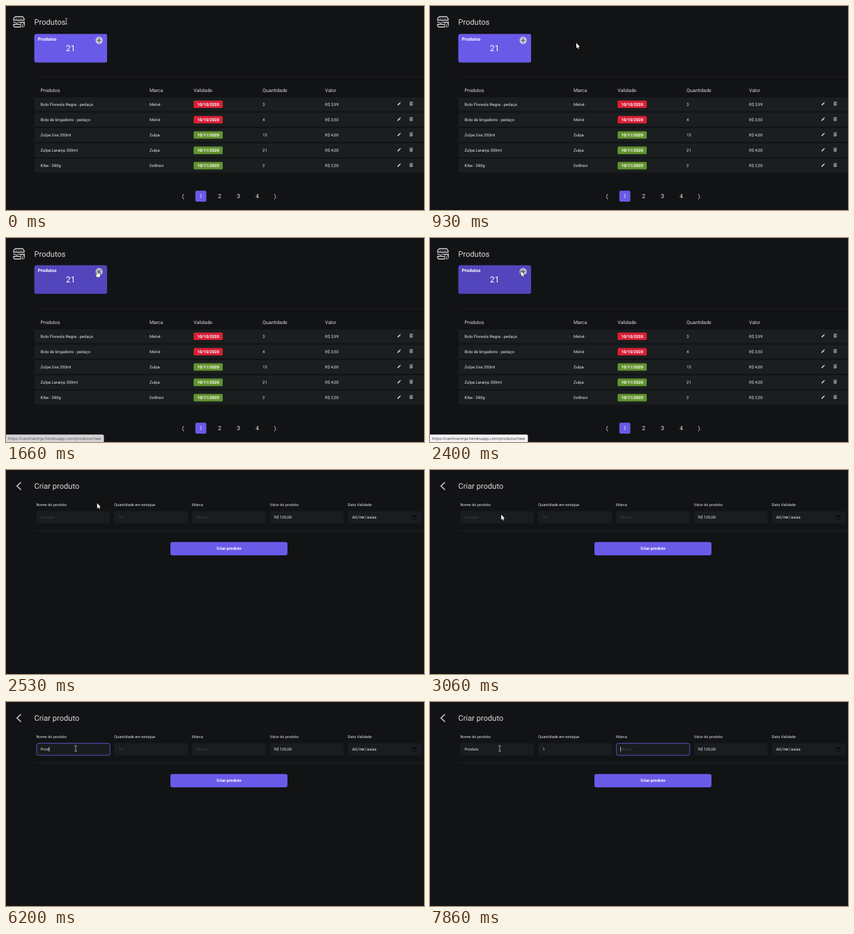
Recreate the animation shown at these times as an HTML page with a canvas. Size 600 by 294 pixels, loop 8000 ms.

```html
<!DOCTYPE html>
<html lang="pt-BR">
<head>
<meta charset="utf-8">
<title>Produtos</title>
<style>
  html, body { margin: 0; width: 100%; height: 100%; overflow: hidden; background: #121315; }
  canvas { display: block; width: 600px; height: 294px; }
</style>
</head>
<body>
<canvas id="stage"></canvas>
<script>
const W = 600, H = 294, LOOP = 8000;
const BG = '#121315', ROW = '#1a1e1f', PURPLE = '#6a5ae8';
const canvas = document.getElementById('stage');
const ctx = canvas.getContext('2d');
const ratio = window.devicePixelRatio || 1;
canvas.width = W * ratio;
canvas.height = H * ratio;

const clamp = v => Math.max(0, Math.min(1, v));
const ease = v => v * v * (3 - 2 * v);
const span = (t, a, b) => ease(clamp((t - a) / (b - a)));
const mix = (a, b, k) => a + (b - a) * k;
const mixRgb = (a, b, k) => `rgb(${a.map((v, i) => Math.round(mix(v, b[i], k)))})`;

function text(str, x, y, size, color = '#e2e2e4', weight = 400, align = 'left', family = 'Roboto') {
  ctx.font = `${weight} ${size}px "${family}", sans-serif`;
  ctx.textAlign = align;
  ctx.fillStyle = color;
  ctx.fillText(str, x, y);
}

function box(x, y, w, h, r, fill, stroke) {
  ctx.beginPath();
  ctx.roundRect(x, y, w, h, r);
  if (fill) { ctx.fillStyle = fill; ctx.fill(); }
  if (stroke) { ctx.strokeStyle = stroke; ctx.lineWidth = 0.9; ctx.stroke(); }
}

function path(d, x, y, fill, stroke, width = 1) {
  const p = new Path2D(d);
  ctx.save();
  ctx.translate(x, y);
  ctx.lineJoin = ctx.lineCap = 'round';
  if (stroke) { ctx.strokeStyle = stroke; ctx.lineWidth = width; ctx.stroke(p); }
  if (fill) { ctx.fillStyle = fill; ctx.fill(p); }
  ctx.restore();
}

// ---- product list ----

const PAGE_SWITCH = 2500;
const rows = [
  ['Bolo Floresta Negra - pedaço', 'Melvê', '10/10/2020', '3', 'R$ 3,99'],
  ['Bolo de brigadeiro - pedaço', 'Melvê', '10/10/2020', '4', 'R$ 3,50'],
  ['Zulpa Uva 350ml', 'Zulpa', '10/11/2020', '13', 'R$ 4,00'],
  ['Zulpa Laranja 350ml', 'Zulpa', '10/11/2020', '21', 'R$ 4,00'],
  ['Kibe - 380g', 'DoBravi', '10/11/2020', '2', 'R$ 2,50']
];
const columns = [49.5, 206, 269.3, 368.3, 458];
const heads = ['Produtos', 'Marca', 'Validade', 'Quantidade', 'Valor'];

function snackIcon() {
  const c = '#e4e4e6';
  path('M.8 5.8 Q.8 .8 5 .8 H12 Q16.2 .8 16.2 5.8 Z', 10, 14.6, null, c, 1.1);
  path('M.6 8.6 H3 L5.2 10.4 L7.4 8.6 H16.4', 10, 14.6, null, c, 1);
  path('M.8 11.8 H9 M.8 11.8 V13 Q.8 15.8 3.6 15.8 H10.5 M16.4 8.6 V10', 10, 14.6, null, c, 1.1);
  path('M10.2 12.4 A3.3 3.3 0 1 1 16.8 12.4 A3.3 3.3 0 1 1 10.2 12.4 M12.2 12.3 L13.3 13.5 L15 11.4', 10, 14.6, null, c, 0.9);
  path('M5 3.2 H5.6 M8.2 2.8 H8.8 M11.4 3.4 H12', 10, 14.6, null, c, 0.8);
}

function summaryCard(t) {
  const hover = span(t, 1360, 1560);
  ctx.save();
  ctx.translate(0, -hover);
  box(40.6, 40.2, 104.5, 41.2, 3, mixRgb([106, 90, 232], [83, 69, 187], hover));
  text('Produtos', 45.8, 50.2, 6.55, '#fff', 700);
  text('21', 92.8, 65.2, 12, '#fff', 400, 'center');
  ctx.translate(133.7, 49.5);
  ctx.rotate(span(t, 1550, 1770) * Math.PI / 2);
  ctx.beginPath();
  ctx.arc(0, 0, 5.2, 0, 7);
  ctx.fillStyle = mixRgb([201, 201, 208], [188, 188, 200], hover);
  ctx.fill();
  path('M-2.7 0 H2.7 M0 -2.7 V2.7', 0, 0, null, '#504c70', 1.1);
  ctx.restore();
}

function table() {
  heads.forEach((h, i) => text(h, columns[i], 124.2, 6.95, '#dcdcde'));
  rows.forEach((row, n) => {
    const y = 131.7 + n * 22.1;
    box(41, y, 562, 19.9, 2, ROW);
    row.forEach((cell, i) => {
      if (i === 2) {
        box(269.3, y + 4.6, 41.8, 10.8, 1.5, n < 2 ? '#d82036' : '#62932f');
        text(cell, 290.3, y + 12.1, 5.9, '#fff', 700, 'center');
      } else {
        text(cell, columns[i], y + 12.1, 5.9);
      }
    });
    const c = '#d4d4d6';
    path('M-2.4 2.4 V1.3 L.8 -1.9 L1.9 -.8 L-1.3 2.4 Z M1.2 -2.3 L1.7 -2.7 L2.7 -1.7 L2.3 -1.2 Z', 564.3, y + 9.2, c);
    path('M-1.9 -2.4 H1.9 M-1.5 -1 H1.5 V2.2 H-1.5 Z M-.6 .1 L.6 1.3 M.6 .1 L-.6 1.3', 581.7, y + 9.2, null, c, 0.7);
  });
}

function pager() {
  box(271.8, 266.2, 15.8, 15.8, 2, PURPLE);
  [279.7, 306.7, 333.6, 360.6].forEach((x, i) => text(String(i + 1), x, 277, 8.6, '#e4e4e6', 400, 'center'));
  path('M.9 -3.5 L-.8 0 L.9 3.5', 254, 274.7, null, '#d4d4d6', 0.8);
  path('M-.9 -3.5 L.8 0 L-.9 3.5', 386.4, 274.7, null, '#d4d4d6', 0.8);
}

function statusBar(t) {
  const k = clamp((t - 1540) / 140);
  if (!k) return;
  ctx.globalAlpha = k;
  box(-3, 283.2, 143.5, 14, 2, '#f5f2f5');
  text('https://cantinaninja.herokuapp.com/produtos/new', 2.8, 291.4, 5.65, '#3c3c3e', 400, 'left', 'Open Sans');
  ctx.globalAlpha = 1;
}

function listPage(t) {
  snackIcon();
  text('Produtos', 40.6, 27.2, 11.1, '#dedee0');
  summaryCard(t);
  box(41, 101.7, 560, 0.8, 0, '#202224');
  table();
  pager();
  statusBar(t);
}

// ---- creation form ----

const labels = ['Nome do produto', 'Quantidade em estoque', 'Marca', 'Valor do produto', 'Data Validade'];
const hints = ['Produto', '50', 'Marca'];
const keyTimes = [...'Produto'].map((_, i) => 5350 + i * 245);
const FOCUS = [3740, 6920, 7600, LOOP + 1000];
const QTY_KEY = 7200;
const BLINK = 530;

function typed(field, t) {
  if (field === 0) return 'Produto'.slice(0, keyTimes.filter(k => k <= t).length);
  if (field === 1) return t >= QTY_KEY ? '1' : '';
  return field === 3 ? 'R$ 100,00' : '';
}

function caretOn(t) {
  const last = Math.max(...[...FOCUS, ...keyTimes, QTY_KEY].filter(k => k <= t));
  return Math.floor((t - last) / BLINK) % 2 === 0;
}

function field(i, t) {
  const x = 43.8 + i * 111.75, base = 70;
  text(labels[i], x - 0.2, 52, 5.57, '#e0e0e2');
  box(x, 59.2, 105.6, 17.9, 3, '#1a1d1f');
  if (i < 3) {
    const ring = span(t, FOCUS[i], FOCUS[i] + 120) * (1 - span(t, FOCUS[i + 1], FOCUS[i + 1] + 120));
    if (ring > 0) {
      ctx.globalAlpha = ring;
      box(x + 0.1, 59.4, 105.4, 17.5, 3, null, '#6153cc');
      ctx.globalAlpha = 1;
    }
  }
  if (i === 4) {
    text('dd/mm/aaaa', x + 6, base, 5.8, '#e0e0e2', 400, 'left', 'DejaVu Sans Mono');
    path('M-2.4 -2 H2.4 V2.7 H-2.4 Z M-2.4 -1.4 H2.4 M-1.4 -2.8 V-2 M1.4 -2.8 V-2', 586, 68, null, '#040405', 0.8);
    return;
  }
  const value = typed(i, t);
  if (value) text(value, x + 6, base, 5.65, '#e6e6e8');
  else text(hints[i], x + 6, base, 5.57, '#3f4245');
  if (i < 3 && t >= FOCUS[i] && t < FOCUS[i + 1] && caretOn(t)) {
    ctx.font = '400 5.65px "Roboto", sans-serif';
    ctx.textAlign = 'left';
    const w = value ? ctx.measureText(value).width : 0;
    box(x + 6 + w, 64.8, 0.7, 6.6, 0, '#e6e6e8');
  }
}

function formPage(t) {
  path('M2.6 -5 L-2.7 0 L2.6 5', 18.4, 23.1, null, '#b9b9bc', 1.6);
  text('Criar produto', 40.6, 27.2, 11.1, '#dedee0');
  labels.forEach((_, i) => field(i, t));
  box(41, 87.1, 560, 0.8, 0, '#202224');
  box(236, 103.8, 168, 19.2, 3, PURPLE);
  text('Criar produto', 320, 115.3, 6, '#fff', 700, 'center');
}

// ---- pointer ----

const shapes = {
  arrow(x, y) {
    path('M0 0 V7.4 L1.7 5.9 L2.9 8.5 L4.1 8 L3 5.4 H5.2 Z', x, y, '#fff', '#000', 0.8);
  },
  hand(x, y) {
    path('M-.7 .3 Q0 -.7 .7 .3 V3 L3.4 3.6 Q4.2 4 4 5.2 L3.3 8.2 H-.6 L-2.5 5.4 Q-2.5 4.2 -1.6 4.6 L-.7 5.4 Z', x, y, '#fff', '#000', 0.8);
  },
  beam(x, y) {
    path('M-1.4 -4 H-.4 L0 -3.6 L.4 -4 H1.4 M0 -3.6 V3.6 M-1.4 4 H-.4 L0 3.6 L.4 4 H1.4', x, y, null, '#d4d4d6', 0.7);
  }
};

// time, x, y
const stops = [
  [0, 86.5, 22], [930, 210, 53.3], [1520, 131.2, 48.4], [2340, 130.8, 47.8],
  [2600, 130.8, 47.8], [2900, 102.2, 64.3], [3560, 102.2, 64.3], [3740, 100, 67]
];

function pointer(t) {
  let [, x, y] = stops[0];
  for (let i = 1; i < stops.length; i++) {
    const a = stops[i - 1], b = stops[i], k = span(t, a[0], b[0]);
    if (t >= a[0]) { x = mix(a[1], b[1], k); y = mix(a[2], b[2], k); }
  }
  let kind = 'arrow';
  if (t < 160 || t >= 3600) kind = 'beam';
  else if (t >= 1480 && t < 2340) kind = 'hand';
  shapes[kind](x, y);
}

function draw(now) {
  const t = now % LOOP;
  ctx.setTransform(ratio, 0, 0, ratio, 0, 0);
  ctx.textRendering = 'geometricPrecision';
  ctx.fillStyle = BG;
  ctx.fillRect(0, 0, W, H);
  if (t < PAGE_SWITCH) listPage(t);
  else formPage(t);
  pointer(t);
}

const start = performance.now();
function tick() {
  draw(performance.now() - start);
  requestAnimationFrame(tick);
}
tick();
</script>
</body>
</html>
```
